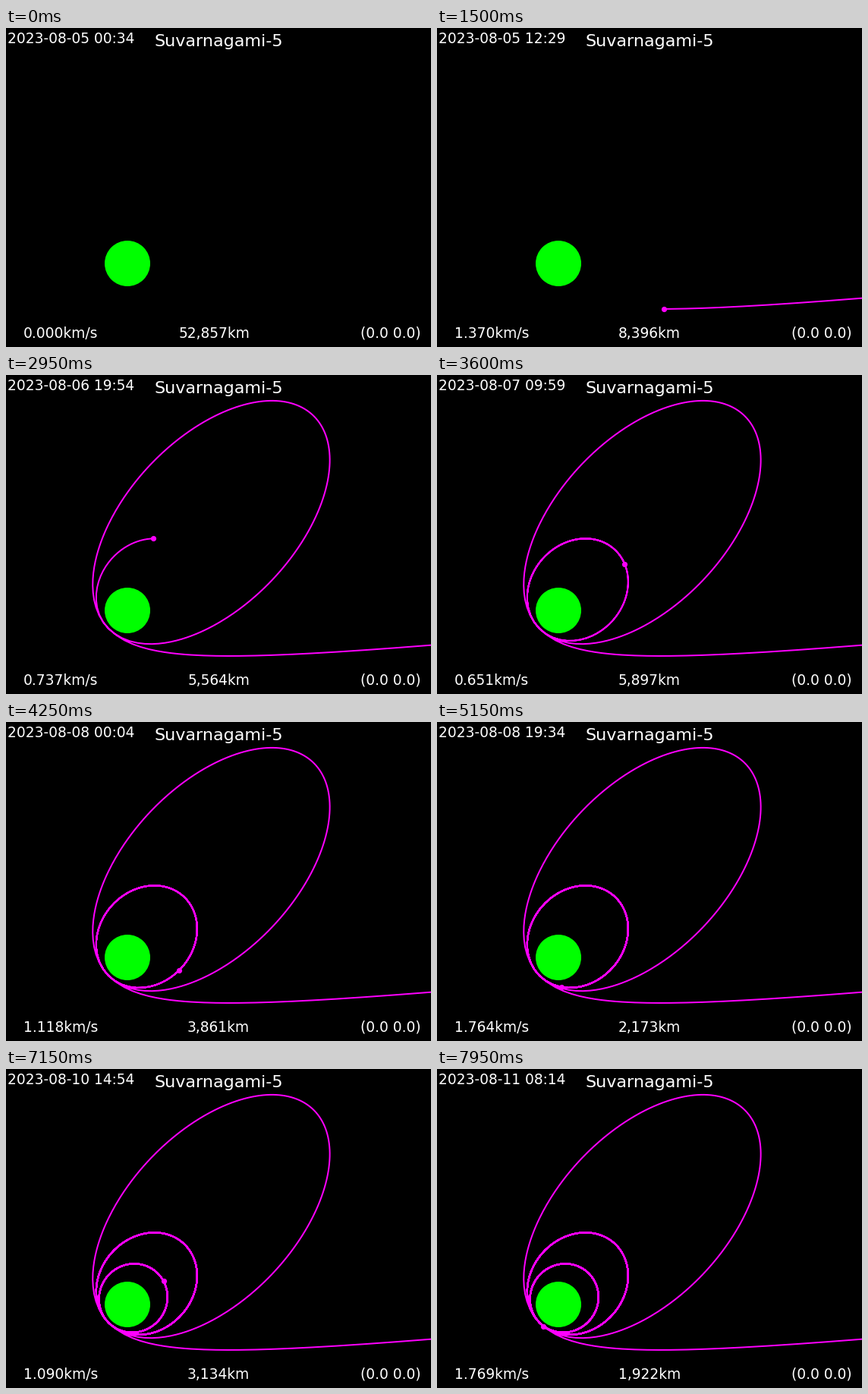
A matplotlib script that plays this animation: 560 by 420 pixels, repeating every 8 s.

```python
import numpy as np
import matplotlib.pyplot as plt
from matplotlib.animation import FuncAnimation

W, H, DPI = 560, 420, 100
FRAMES, INTERVAL, HOLD = 160, 50, 19

MU = 4902.8            # km^3/s^2
KM_PER_PX = 55.3
MOON = (160, 310)
SAMPLE = 5             # minutes between path samples
PER_FRAME = 13         # samples per animation frame
START = np.datetime64("2023-08-05T00:34")

# (begin min, periapsis min, semi-major axis km, eccentricity, periapsis angle deg)
ORBITS = [
    (0, 804.93, -6677, 1.28485, 224.7),
    (804.9, 804.9, 10758, 0.8232, 226.4),
    (2473.6, 2473.5, 3977.8, 0.518, 227.2),
    (6225.6, 6225.6, 2543, 0.2455, 227.5),
]


def orbit_position(t, periapsis, a, e, angle):
    """Clockwise Kepler motion around the focus, in km with y up."""
    mean = (t - periapsis) * 60 * np.sqrt(MU / abs(a) ** 3)
    if e > 1:
        f = np.arcsinh(mean / e)
        for _ in range(30):
            f -= (e * np.sinh(f) - f - mean) / (e * np.cosh(f) - 1)
        x = -a * (e - np.cosh(f))
        y = -a * np.sqrt(e * e - 1) * np.sinh(f)
    else:
        mean = (mean + np.pi) % (2 * np.pi) - np.pi
        f = np.pi * np.sign(mean)
        for _ in range(30):
            f -= (f - e * np.sin(f) - mean) / (1 - e * np.cos(f))
        x = a * (np.cos(f) - e)
        y = a * np.sqrt(1 - e * e) * np.sin(f)
    w = np.radians(angle)
    return x * np.cos(w) + y * np.sin(w), x * np.sin(w) - y * np.cos(w)


def flight_path():
    t = np.arange((FRAMES - 1 - HOLD) * PER_FRAME + 1) * float(SAMPLE)
    x, y = np.zeros_like(t), np.zeros_like(t)
    for begin, *elements in ORBITS:
        part = t >= begin
        x[part], y[part] = orbit_position(t[part], *elements)
    return x, y


px, py = flight_path()
distance = np.hypot(px, py)
speed = np.r_[0, np.hypot(np.diff(px), np.diff(py)) / (SAMPLE * 60)]
sx, sy = MOON[0] + px / KM_PER_PX, MOON[1] - py / KM_PER_PX

fig = plt.figure(figsize=(W / DPI, H / DPI), dpi=DPI, facecolor="black")
ax = fig.add_axes([0, 0, 1, 1])
ax.set_xlim(0, W)
ax.set_ylim(H, 0)
ax.axis("off")


def px_to_pt(size):
    return size * 72 / DPI


def label(x, y, text, align, size=18.7):
    return ax.text(x, y, text, color="white", ha=align, va="baseline",
                   family="DejaVu Sans", fontsize=px_to_pt(size))


ax.add_patch(plt.Circle(MOON, 30, color="#00ff00", lw=0))
trail, = ax.plot([], [], color="#ff00ff", lw=px_to_pt(2))
craft, = ax.plot([], [], "o", color="#ff00ff", ms=px_to_pt(7.2), mew=0,
                 snap=False)

label(280, 24, "Suvarnagami-5", "center", 22.3)
label(547, 408, "(0.0 0.0)", "right")
date_text = label(2, 20, "", "left")
speed_text = label(121, 408, "", "right")
distance_text = label(321, 408, "", "right")


def update(frame):
    i = max(0, frame - HOLD) * PER_FRAME
    trail.set_data(sx[:i + 1], sy[:i + 1])
    craft.set_data(sx[i:i + 1], sy[i:i + 1])
    now = START + np.timedelta64(i * SAMPLE, "m")
    date_text.set_text(str(now).replace("T", " "))
    speed_text.set_text(f"{speed[i]:.3f}km/s")
    distance_text.set_text(f"{distance[i]:,.0f}km")
    return trail, craft, date_text, speed_text, distance_text


anim = FuncAnimation(fig, update, frames=FRAMES, interval=INTERVAL,
                     repeat=True, repeat_delay=0)
plt.show()
```
